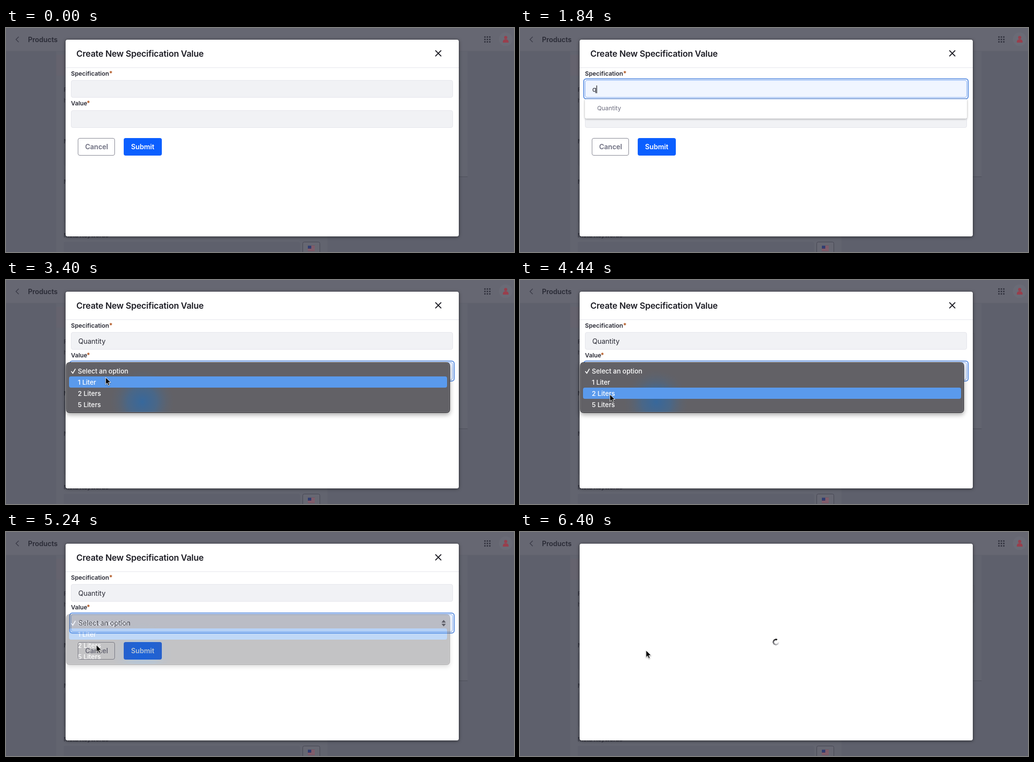
Recreate the animation shown at these times as an HTML page. Size 1040 px wide and 460 px high, loop 6440 ms.

```html
<!DOCTYPE html>
<html lang="en">
<head>
<meta charset="utf-8">
<title>Create New Specification Value</title>
<style>
  html, body { margin: 0; width: 100%; height: 100%; overflow: hidden; background: #5e606c; }
  svg { display: block; position: absolute; left: 0; top: 0; }
  text { font: 14px Inter, "Open Sans", sans-serif; fill: #272833; white-space: pre; }
  .bold { font-weight: 600; }
  .label { font-size: 12.25px; font-weight: 600; }
  .star { font-size: 13px; font-weight: 700; fill: #b0531c; }
  .dim text { fill: #3b3c48; }
  .input { fill: #f1f2f5; stroke: #e4e5eb; }
  .ring { fill: #fff; stroke: #5a8ee2; stroke-width: 2; }
  .focus .input { fill: #f0f5ff; stroke: #80acf5; }
  .field:not(.focus) .ring { display: none; }
  #list text { font-size: 12.25px; fill: #6b6c7e; }
  #popup text { font-size: 13.4px; font-weight: 500; fill: #fff; }
  #modal { filter: drop-shadow(0 1px 3px #0009); }
  #list rect { filter: drop-shadow(0 1px 2px #0005); }
  #panel { filter: drop-shadow(0 4px 5px #0005); }
  #pointer { filter: drop-shadow(0 1px 1px #0006); }
  #spinner {
    position: absolute; left: 517px; top: 219px; width: 14px; height: 14px; border-radius: 50%;
    background: conic-gradient(transparent 15%, #c4c4c8 32%, #77777c 65%, #111 97%);
    -webkit-mask: radial-gradient(circle, transparent 3.4px, #000 4px);
    mask: radial-gradient(circle, transparent 3.4px, #000 4px);
  }
</style>
</head>
<body>
<svg width="1040" height="460" viewBox="0 0 1040 460">
  <defs>
    <radialGradient id="glow" gradientUnits="userSpaceOnUse" cx="279" cy="250" r="66">
      <stop offset="0" stop-color="#37689c"/>
      <stop offset=".45" stop-color="#44688f" stop-opacity=".8"/>
      <stop offset="1" stop-color="#5d6470" stop-opacity="0"/>
    </radialGradient>
  </defs>

  <g class="dim">
    <rect width="1040" height="460" fill="#5e606c"/>
    <rect x="103" y="47" width="842" height="258" fill="#62646f"/>
    <rect x="103" y="55" width="555" height="405" fill="#62646f"/>
    <rect x="103" y="55" width="555" height="43" fill="#65636e"/>
    <path d="M927 305.5h18" stroke="#4d4f5a"/>
    <path d="M927 110h3.5v34H927" fill="none" stroke="#5c5e69"/>
    <rect width="1040" height="47" fill="#666772"/>
    <path d="M0 47.5h1040" stroke="#60626d"/>
    <path d="M26 18l-5.500 5.500 5.500 5.500" fill="none" stroke="#3b3c48" stroke-width="1.500"/>
    <text class="bold" x="45" y="29" style="fill:#292a35">Products</text>
    <path d="M979 18.500h13M979 23.500h13M979 28.500h13" stroke="#363743" stroke-width="3" stroke-dasharray="3 2"/>
    <circle cx="1023" cy="23" r="14" fill="#6a6b76"/>
    <g fill="#983f4d">
      <circle cx="1023" cy="19.500" r="3.200"/>
      <path d="M1017 29q0-6 6-6t6 6q0 1-1 1h-10q-1 0-1-1z"/>
    </g>
    <g fill="#5e606c">
      <rect x="118" y="247" width="484" height="36" rx="4"/>
      <rect x="118" y="330" width="484" height="70" rx="4"/>
      <rect x="118" y="439" width="484" height="36" rx="4"/>
    </g>
    <text class="label" x="118" y="131">F</text>
    <text class="label" x="118" y="153" style="font-weight:400">h</text>
    <text class="label" x="118" y="237">M</text>
    <text class="label" x="118" y="320">M</text>
    <text class="label" x="118" y="430">Meta Keywords</text>
    <rect x="607.500" y="439.500" width="35" height="35" rx="3" fill="#666772" stroke="#444551"/>
    <rect x="618" y="447" width="14" height="11" fill="#777783"/>
    <path d="M618 448h14M618 451h14M618 454h14M618 457h14" stroke="#884353" stroke-width="1.500"/>
    <rect x="618" y="447" width="7" height="6" fill="#303d70"/>
  </g>

  <rect id="modal" x="122" y="24" width="805" height="404" rx="4" fill="#fff"/>

  <g id="form">
    <text class="bold" x="144" y="59" style="font-size:17.5px;letter-spacing:-.2px;fill:#1c1c24">Create New Specification Value</text>
    <path d="M879.500 46.500l11 11m0-11l-11 11" stroke="#1c1c24" stroke-width="1.800" stroke-linecap="round"/>
    <path d="M122 81.500h805" stroke="#e4e5eb"/>
    <text class="label" x="133" y="98">Specification</text>
    <text class="star" x="211" y="98">*</text>
    <text class="label" x="133" y="159">Value</text>
    <text class="star" x="165" y="159">*</text>

    <g id="spec" class="field">
      <rect class="ring" x="130.500" y="104.500" width="787" height="41" rx="5"/>
      <rect class="input" x="133.500" y="107.500" width="781" height="35" rx="3.500"/>
      <text x="148" y="131"></text>
      <path id="caret" d="M0 118v16" stroke="#111" stroke-width="1.200"/>
    </g>
    <g id="value" class="field">
      <rect class="ring" x="130.500" y="166.500" width="787" height="41" rx="5"/>
      <rect class="input" x="133.500" y="169.500" width="781" height="35" rx="3.500"/>
      <text x="148" y="192"></text>
      <path id="arrows" d="M891.500 186l4.500-5.500 4.500 5.500zm0 2.500l4.500 5.500 4.500-5.500z" fill="#5c5d6b"/>
    </g>

    <rect x="147.500" y="226.500" width="75" height="35" rx="3.500" fill="#fff" stroke="#81828f"/>
    <text class="bold" x="162" y="249" style="fill:#6b6c7e">Cancel</text>
    <rect x="241" y="226" width="78" height="36" rx="4" fill="#0b5fff"/>
    <text class="bold" x="256" y="249" style="fill:#fff">Submit</text>

    <g id="list">
      <rect x="133" y="146" width="782" height="40" rx="3" fill="#fff"/>
      <g></g>
    </g>
  </g>

  <g id="popup">
    <rect id="panel" x="123.500" y="169.500" width="785" height="103" rx="6" fill="#626166" stroke="#242428"/>
    <rect x="124.500" y="170.500" width="783" height="101" rx="5" fill="none" stroke="#79787d"/>
    <rect x="205" y="176" width="142" height="95" fill="url(#glow)"/>
    <rect id="bar" x="129" width="774" height="23" rx="4" fill="#5a9aec"/>
    <path d="M134 188l2.800 3.500 5-8.500" fill="none" stroke="#fff" stroke-width="1.700" stroke-linecap="round"/>
    <g></g>
  </g>

  <path id="beam" d="M-3-8q3 0 3 2v12q0 2-3 2M3-8q-3 0-3 2v12q0 2 3 2M-2 2h4" fill="none" stroke="#222" stroke-width="1.200"/>
  <path id="pointer" d="M0 0v14.500l3.300-3.100 2.300 5.300 2.500-1.100-2.300-5.200h4.700z" fill="#000" stroke="#fff" stroke-width="1"/>
</svg>
<div id="spinner"></div>

<script>
const LOOP = 6440, STEP = 40;
const FOCUS = 1360, TYPED = 1620, PICK = 2520, OPEN = 3080, CHOOSE = 5040, FADE = 5140, CLOSED = 5300, SEND = 5840;
const options = ["Select an option", "1 Liter", "2 Liters", "5 Liters"];
const specs = ["Color", "Finish", "Height", "Length", "Material", "Quantity", "Size", "Weight", "Width"];
// time, x, y of the pointer tip
const path = [
  [600, 319, 319], [1200, 195, 125], [1960, 195, 125], [2400, 238, 156], [2560, 238, 156],
  [2800, 228, 163], [3040, 216, 184], [3200, 213, 187], [3400, 204, 200], [3520, 202, 214],
  [3760, 202, 214], [3960, 192, 232], [4080, 192, 232], [4280, 186, 251], [4440, 184, 235],
  [4760, 187, 214], [5080, 188, 214], [5240, 185, 232], [5520, 258, 243], [LOOP, 258, 243]
];

const $ = id => document.getElementById(id);
const show = (el, on) => { el.style.display = on ? "" : "none"; };
const setText = (el, s) => { if (el.textContent !== s) el.textContent = s; };
const rows = (names, x, y, gap) =>
  names.map((s, i) => `<text x="${x}" y="${y + i * gap}">${s}</text>`).join("");

const specText = document.querySelector("#spec text");
const valueText = document.querySelector("#value text");
const listRect = document.querySelector("#list rect");
const listRows = document.querySelector("#list g");
document.querySelector("#popup g").innerHTML = rows(options, 147, 192, 23);
let listed;

function pointerAt(t) {
  if (t <= path[0][0]) return path[0].slice(1);
  const i = path.findIndex(p => p[0] >= t);
  const [t0, x0, y0] = path[i - 1], [t1, x1, y1] = path[i];
  const u = (t - t0) / (t1 - t0), k = u * u * (3 - 2 * u);
  return [x0 + (x1 - x0) * k, y0 + (y1 - y0) * k];
}

function drawSpec(t) {
  const focused = t >= FOCUS && t < OPEN - STEP;
  $("spec").classList.toggle("focus", focused);
  setText(specText, t < TYPED ? "" : t < PICK ? "q" : "Quantity");
  const since = t - (t < TYPED ? FOCUS : t < PICK ? TYPED : PICK);
  show($("caret"), focused && since % 1000 < 500);
  const end = specText.textContent ? specText.getComputedTextLength() : 0;
  $("caret").setAttribute("transform", `translate(${148.5 + end})`);

  show($("list"), t >= FOCUS && t < PICK);
  const names = t < TYPED ? specs : ["Quantity"];
  if (names.length !== listed) {
    listed = names.length;
    listRect.setAttribute("height", 12 + 28 * listed);
    listRows.innerHTML = rows(names, 158, 169, 28);
  }
}

function drawValue(t, y) {
  $("value").classList.toggle("focus", t >= OPEN - STEP);
  setText(valueText, t < PICK ? "" : t < CLOSED ? options[0] : options[1]);
  show($("arrows"), t >= PICK);
  show($("popup"), t >= OPEN && t < CLOSED);
  $("popup").style.opacity = Math.min(1, (CLOSED - t) / (CLOSED - FADE));
  const row = t < CHOOSE ? Math.max(0, Math.min(3, Math.floor((y - 175) / 23))) : 1;
  $("bar").setAttribute("y", 175 + 23 * row);
  show($("bar"), t < CHOOSE || t >= CHOOSE + 2 * STEP);
}

function draw() {
  const t = Math.floor(performance.now() % LOOP / STEP) * STEP;
  const [x, y] = pointerAt(t);
  drawSpec(t);
  drawValue(t, y);
  show($("form"), t < SEND);
  show($("spinner"), t >= SEND);
  $("spinner").style.transform = `rotate(${25 + (t - 6400) * .36}deg)`;

  const visible = t >= 640 && (t < TYPED || t >= 2000);
  const overText = t < PICK && y > 107 && y < 143;
  for (const id of ["beam", "pointer"]) {
    $(id).setAttribute("transform", `translate(${x} ${y})`);
    show($(id), visible && overText === (id === "beam"));
  }
  requestAnimationFrame(draw);
}
draw();
</script>
</body>
</html>
```
